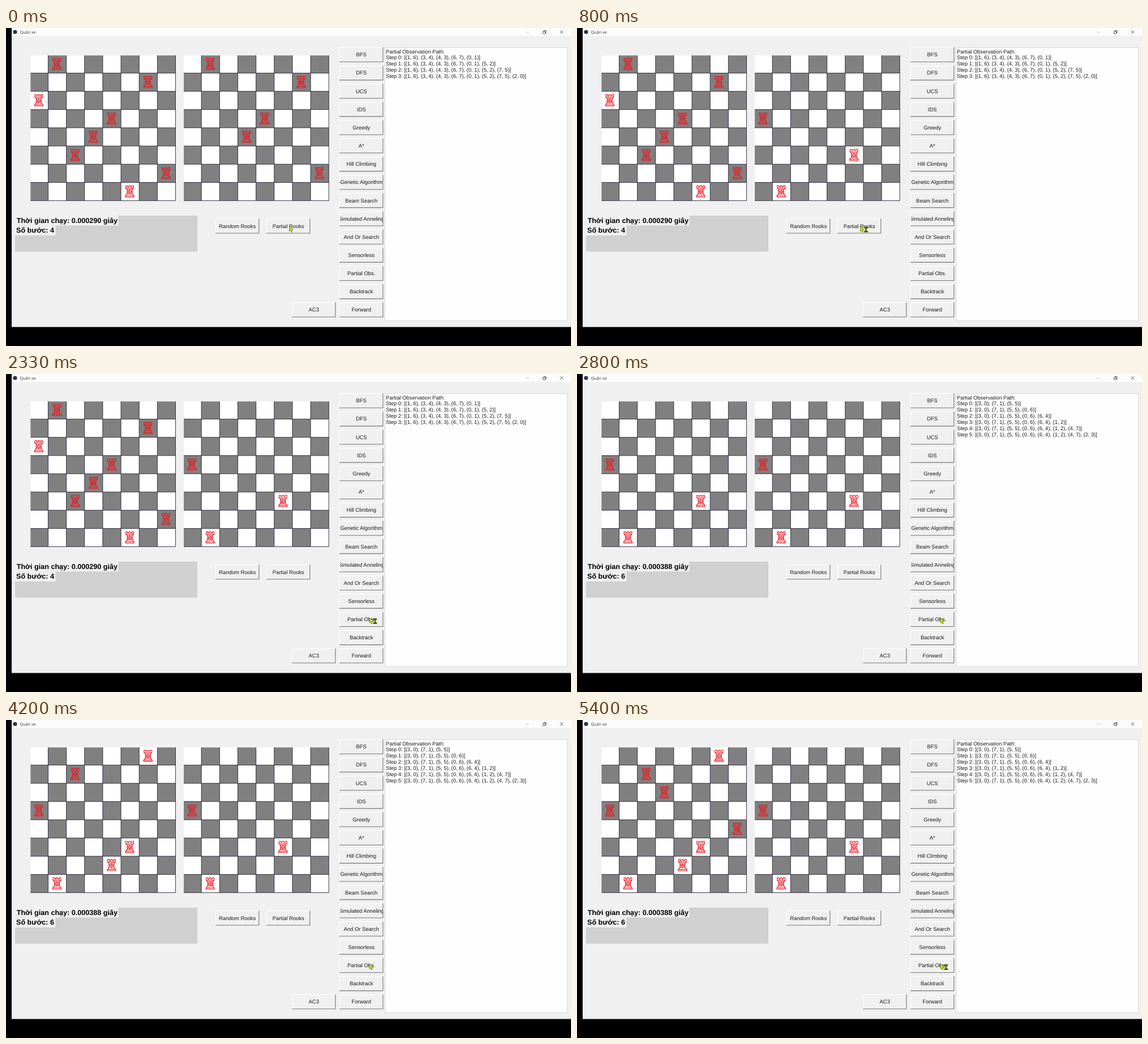
These frames come from a looping animation (998 by 561 pixels, 5470 ms). An HTML page:

```html
<!DOCTYPE html>
<html lang="vi">
<head>
<meta charset="utf-8">
<title>Quân xe</title>
<style>
  html, body { margin: 0; width: 100%; height: 100%; overflow: hidden; background: #000; }
  svg { display: block; width: 998px; height: 561px; }
  text {
    font-family: "Liberation Sans", Arial, sans-serif;
    fill: #1a1a1a;
    text-rendering: geometricPrecision;
    white-space: pre;
  }
  .btn text { font-size: 9.45px; text-anchor: middle; }
  .log text { font-size: 9.33px; }
  .info text { font-size: 12.6px; font-weight: bold; fill: #000; }
  .title { font: 7.2px "Open Sans", "Noto Sans", sans-serif; fill: #333; }
</style>
</head>
<body>
<svg viewBox="0 0 998 561">
  <defs>
    <g id="rook" fill="none" stroke="#f0141c" stroke-width="1.15" stroke-linejoin="round">
      <path d="M-6.9-9.8h3v2h2.4v-2h3v2h2.4v-2h3v4.4l-2.4 2v7.8l1.6 1.6v1.6h1.5v2.4h-15.2v-2.4h1.5v-1.6l1.6-1.6v-7.8l-2.4-2z"/>
      <path d="M-6.4-5.6H6.4M-4.5-3.2H4.5M-4.5-.6H4.5M-4.5 2H4.5M-4.7 4.5H4.7M-6 7.6H6M0-3.2v2.6M-2.3-.6V2M2.3-.6V2M0 2v2.5"/>
    </g>
  </defs>
  <rect x="10" width="988" height="527.5" fill="#f0f0f0"/>
  <rect x="10" width="988" height="14" fill="#fcfcfc"/>
  <circle cx="16" cy="7" r="3.6" fill="#24384f"/>
  <text class="title" x="24.5" y="9.8">Quân xe</text>
  <g fill="none" stroke="#333" stroke-width=".8">
    <path d="M918 7.5h6" stroke="#bbb"/>
    <path d="M948.5 6h4v4h-4zM950 6v-1.4h4v4h-1.5M978.8 4.4l5.4 5.4M984.2 4.4l-5.4 5.4"/>
  </g>

  <g id="boards"></g>
  <g id="leftRooks"></g>
  <g id="rightRooks"></g>

  <g class="info">
    <rect x="16" y="331" width="322" height="63.5" fill="#d0d0d0"/>
    <rect x="16" y="331" width="182.5" height="17.5" fill="#f0f0f0"/>
    <rect x="16" y="348.5" width="71.5" height="17.5" fill="#f0f0f0"/>
    <text id="time" x="18.7" y="343.6"></text>
    <text id="count" x="18" y="361.4"></text>
  </g>

  <g id="buttons"></g>
  <rect x="669.5" y="34.5" width="322" height="482" fill="#fefefe" stroke="#d4d4e2" stroke-width=".9"/>
  <g class="log" id="log"></g>

  <g id="cursor">
    <path d="M0 0V9.2L2 7.4 3.6 10.8 5.2 10 3.7 6.8 6.5 6.5z" fill="#c6e800" stroke="#4a5208" stroke-width=".6"/>
    <g id="busy" transform="translate(6.3 1)">
      <path d="M.9 1.4H6.3L4.3 5 6.3 8.6H.9L2.9 5z" fill="#b4d400" stroke="#2e3604" stroke-width=".8"/>
      <path d="M2 2.6H5.2L3.6 5zM1.6 8.2L3.6 6.2 5.6 8.2z" fill="#4a5a00"/>
      <path d="M.2.9H7M.2 9.1H7" stroke="#262c02" stroke-width="1.4"/>
    </g>
  </g>
</svg>
<script>
const LOOP = 5470, CELL = 32.15, TOP = 47.4, LEFT = 42.3, RIGHT = 313;
const PLACE_AT = 400, SOLVE_AT = 2550, STEP_MS = 500;

const $ = id => document.getElementById(id);
const pairs = s => s.split(' ').map(p => [+p[0], +p[1]]);

const before = { rooks: pairs('16 34 43 67 01 52 75 20'), given: 5, time: '0.000290' };
const after = { rooks: pairs('30 71 55 06 64 12 47 23'), given: 3, time: '0.000388' };

function board(x0) {
  let out = `<rect x="${x0 + 1}" y="${TOP + 1}" width="${8 * CELL - 1}" height="${8 * CELL - 1}" fill="#fff"/>`;
  for (let r = 0; r < 8; r++)
    for (let c = 0; c < 8; c++)
      if ((r + c) % 2) {
        const x = x0 + c * CELL + (c ? 0 : 1), y = TOP + r * CELL + (r ? 0 : 1);
        out += `<rect x="${x}" y="${y}" width="${x0 + (c + 1) * CELL - x}" height="${TOP + (r + 1) * CELL - y}" fill="#808080"/>`;
      }
  let lines = '';
  for (let k = 1; k <= 8; k++)
    lines += `M${x0 + 1} ${TOP + k * CELL}h${8 * CELL - 1}M${x0 + k * CELL} ${TOP + 1}v${8 * CELL - 1}`;
  return out + `<path d="${lines}" stroke="#1c1c30" stroke-width=".85"/>`;
}

function button(label, x, cy, i) {
  const y = cy - 13;
  return `<g class="btn"><clipPath id="clip${i}"><rect x="${x + 1}" y="${y}" width="76" height="26"/></clipPath>
    <path d="M${x + .5} ${y + 26}V${y + .5}H${x + 77}" fill="none" stroke="#fff"/>
    <path d="M${x} ${y + 25.7}H${x + 76.8}V${y}" fill="none" stroke="#757575" stroke-width="1.1"/>
    <text x="${x + 38.7}" y="${cy + 3.3}" clip-path="url(#clip${i})">${label}</text></g>`;
}

const drawRooks = (list, x0) => list.map(([r, c]) =>
  `<use href="#rook" x="${x0 + (c + .5) * CELL - .6}" y="${TOP + (r + .5) * CELL - .4}"/>`).join('');

function drawLog({ rooks, given }) {
  const lines = ['Partial Observation Path:'];
  for (let n = given; n <= 8; n++)
    lines.push(`Step ${n - given}: [${rooks.slice(0, n).map(p => `(${p.join(', ')})`).join(', ')}]`);
  return lines.map((s, i) => `<text x="671" y="${44.5 + i * 10.97}">${s}</text>`).join('');
}

$('boards').innerHTML = board(LEFT) + board(RIGHT);

const names = ['BFS', 'DFS', 'UCS', 'IDS', 'Greedy', 'A*', 'Hill Climbing', 'Genetic Algorithm',
  'Beam Search', 'Simulated Anneling', 'And Or Search', 'Sensorless', 'Partial Obs.', 'Backtrack', 'Forward'];
$('buttons').innerHTML = names.map((s, i) => button(s, 589, 47 + i * CELL, i)).join('') +
  button('Random Rooks', 370, 349.3, 'R') + button('Partial Rooks', 460, 349.3, 'P') + button('AC3', 505, 497.1, 'A');

// Pointer stops: time, x, y
const route = [[0, 500.5, 349.5], [1000, 500.5, 349.5], [1480, 636, 450], [1700, 641.5, 417.5],
  [1800, 641.5, 417.5], [1980, 644, 480], [2200, 642, 430], [LOOP, 642, 430]];

function pointer(t) {
  const i = route.findIndex(p => p[0] > t);
  const [t0, x0, y0] = route[i - 1], [t1, x1, y1] = route[i];
  const u = (t - t0) / (t1 - t0), e = u * u * (3 - 2 * u);
  return [x0 + (x1 - x0) * e, y0 + (y1 - y0) * e];
}

let shown = '';
function frame() {
  const t = performance.now() % LOOP;
  const run = t < SOLVE_AT ? before : after;
  const placed = t < PLACE_AT ? before : after;
  const count = run === before ? 8 : Math.min(8, run.given + Math.floor((t - SOLVE_AT) / STEP_MS));
  const key = `${run.time} ${placed.time} ${count}`;
  if (key !== shown) {
    shown = key;
    $('leftRooks').innerHTML = drawRooks(run.rooks.slice(0, count), LEFT);
    $('rightRooks').innerHTML = drawRooks(placed.rooks.slice(0, placed.given), RIGHT);
    $('time').textContent = `Thời gian chạy: ${run.time} giây`;
    $('count').textContent = `Số bước: ${9 - run.given}`;
    $('log').innerHTML = drawLog(run);
  }
  $('cursor').setAttribute('transform', `translate(${pointer(t)})`);
  const busy = t >= PLACE_AT && t < SOLVE_AT || t >= 5100;
  $('busy').style.display = busy ? '' : 'none';
  requestAnimationFrame(frame);
}
frame();
</script>
</body>
</html>
```
